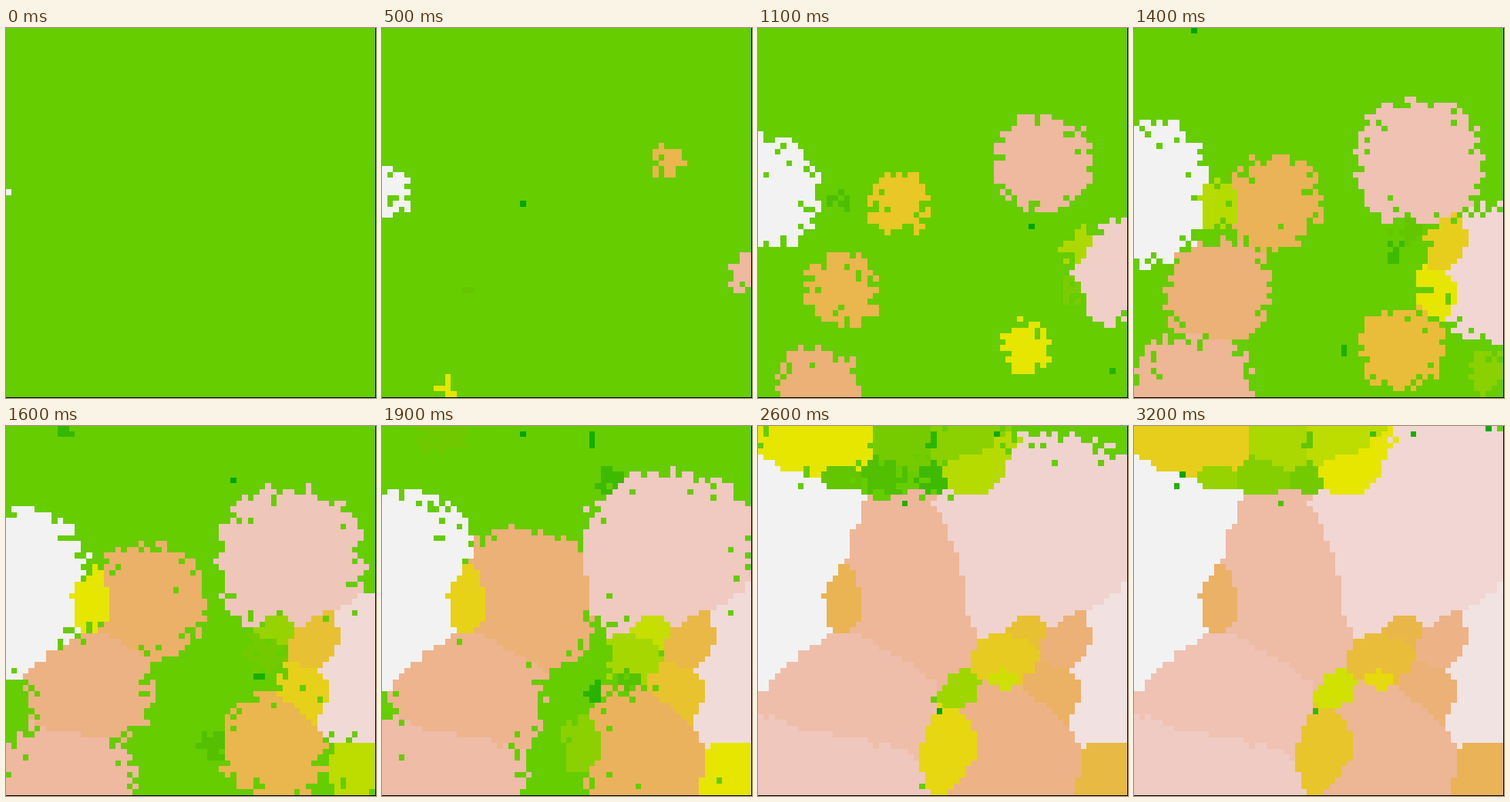
Animation, 480 px wide and 480 px high, one loop 3.3 s. Source, as an HTML page with a canvas:

```html
<!DOCTYPE html>
<html lang="en">
<head>
<meta charset="utf-8">
<title>Growing patches</title>
<style>
  html, body { margin: 0; width: 100%; height: 100%; overflow: hidden; background: #000; }
  canvas { display: block; }
</style>
</head>
<body>
<canvas id="stage" width="480" height="480"></canvas>
<script>
const SIZE = 64, FIELD = 479, STEPS = 33, STEP_MS = 100, PATCHES = 31;
const PACE = 1.08;      // steps a front needs per cell
const ROUNDNESS = 2.4;  // 2 grows circles, higher values squarer patches
const CHANCE = 0.55;    // chance per step that a reached cell fills
const JITTER = 0.8;     // raggedness where two patches meet
const GROUND = '#66cd00';

// Where the large patches start, one per step; later ones find open ground.
const starts = [
  [0, 28], [63, 42], [49, 23], [10, 62], [14, 45], [24, 30], [46, 55], [56, 38],
  [54, 45], [14, 30], [61, 59], [47, 34], [45, 39], [36, 55], [10, 0], [43, 43],
  [39, 9], [36, 46], [36, 2], [24, 1], [13, 8], [21, 8], [31, 9]
];
const ctx = document.getElementById('stage').getContext('2d');

let state = 20117;
function random() {
  state = (state + 0x6D2B79F5) | 0;
  let r = Math.imul(state ^ (state >>> 15), 1 | state);
  r = (r + Math.imul(r ^ (r >>> 7), 61 | r)) ^ r;
  return ((r ^ (r >>> 14)) >>> 0) / 4294967296;
}

function distance(dx, dy) {
  return (Math.abs(dx) ** ROUNDNESS + Math.abs(dy) ** ROUNDNESS) ** (1 / ROUNDNESS);
}

function makeCells() {
  return Array.from({ length: SIZE * SIZE }, (_, n) => ({
    x: n % SIZE,
    y: Math.floor(n / SIZE),
    delay: Math.floor(Math.log(1 - random()) / Math.log(1 - CHANCE)),
    patch: 0,
    filled: Infinity
  }));
}

// A cell belongs to the patch whose front fills it first.
function spread(cells, patch, x, y) {
  for (const cell of cells) {
    const d = distance(cell.x - x, cell.y - y);
    const filled = patch + (d && PACE * d + JITTER * random() + cell.delay);
    if (filled < cell.filled) Object.assign(cell, { patch, filled });
  }
}

function openGround(cells, step) {
  const open = cells.filter(cell => cell.filled > step + 0.5);
  const { x, y } = open.length ? open[Math.floor(random() * open.length)] : cells[0];
  return [x, y];
}

const cells = makeCells();
for (let patch = 0; patch < PATCHES; patch++) {
  spread(cells, patch, ...(starts[patch] || openGround(cells, patch)));
}

// Terrain palette: dark green to yellow, then through tan to near white.
function terrain(i, count) {
  const half = Math.floor(count / 2);
  let rgb;
  if (i < half) {
    const f = half > 1 ? i / (half - 1) : 0, v = 0.65 + 0.25 * f;
    rgb = [f * v, v, 0];
  } else {
    const u = (i - half + 1) / (count - half), v = 0.9 + 0.05 * u;
    rgb = [v, v * (1 - u * (1 - u)), v * u];
  }
  return `rgb(${rgb.map(c => Math.round(c * 255)).join(',')})`;
}

const edge = i => Math.floor(i * FIELD / SIZE);

function draw(step) {
  const count = Math.min(step + 1, PATCHES);
  ctx.fillStyle = '#000';
  ctx.fillRect(0, 0, 480, 480);
  ctx.fillStyle = GROUND;
  ctx.fillRect(0, 0, FIELD, FIELD);
  for (const { x, y, patch, filled } of cells) {
    if (filled > step + 0.5) continue;
    ctx.fillStyle = terrain(count - 1 - patch, count);
    ctx.fillRect(edge(x), edge(y), edge(x + 1) - edge(x), edge(y + 1) - edge(y));
  }
}

const start = performance.now();
let shown = -1;
function tick() {
  const step = Math.floor((performance.now() - start) / STEP_MS) % STEPS;
  if (step !== shown) draw(shown = step);
  requestAnimationFrame(tick);
}
tick();
</script>
</body>
</html>
```
